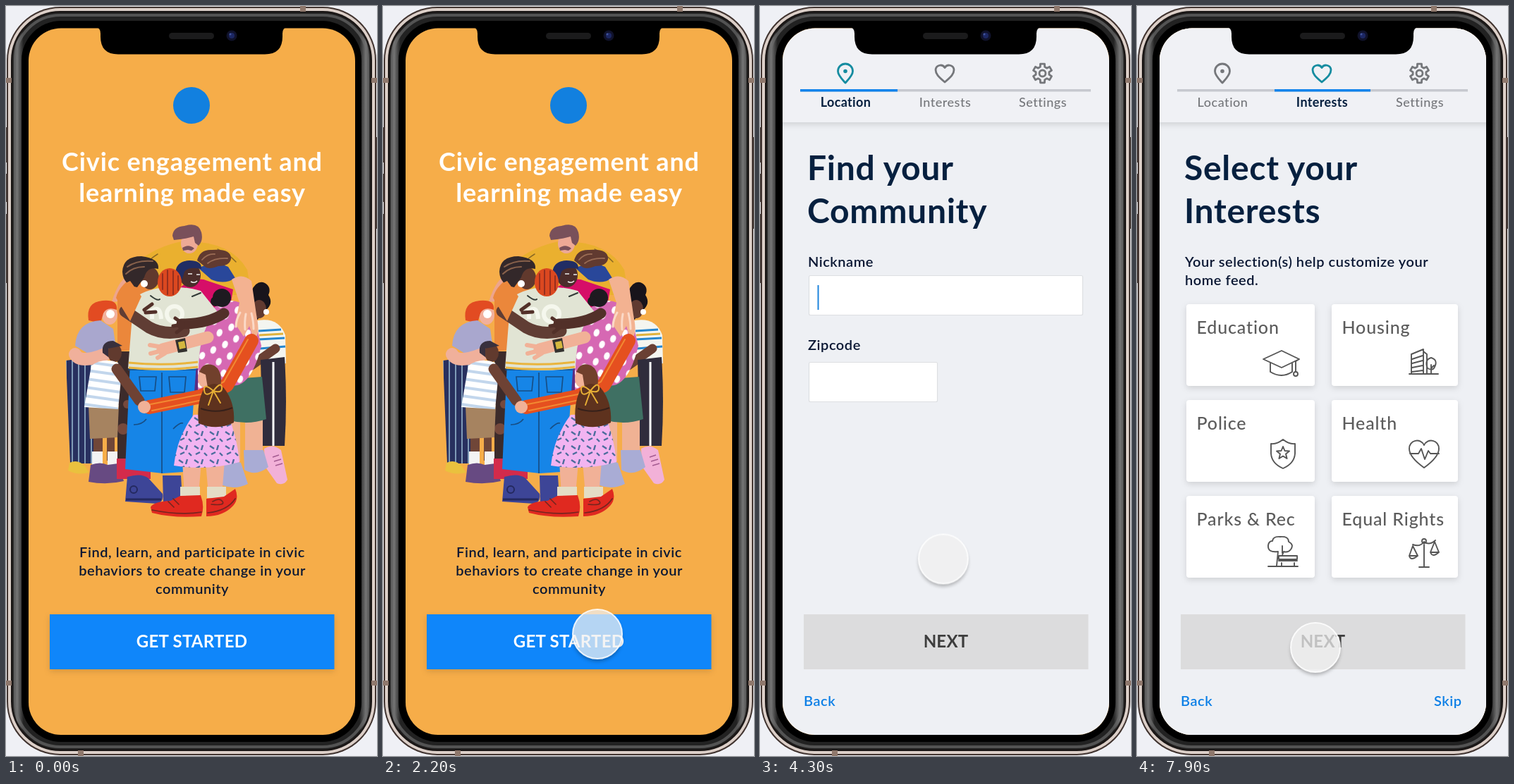
These frames come from a looping animation (526 by 1064 pixels, 8 s). An HTML page:

```html
<!DOCTYPE html>
<html lang="en">
<head>
<meta charset="utf-8">
<title>Civic app walkthrough</title>
<style>
html, body { margin: 0; width: 100%; height: 100%; overflow: hidden; background: #eff0f5; }
svg { display: block; }
#stage { width: 100%; height: 100%; }
text { font-family: Lato, "Open Sans", sans-serif; white-space: pre; }
.title { font-size: 36px; font-weight: 700; letter-spacing: .024em; fill: #fff; }
.head { font-size: 48px; font-weight: 700; letter-spacing: .015em; fill: #06203f; }
.body { font-size: 20px; font-weight: 600; letter-spacing: .027em; fill: #0a1733; }
.tab { font-size: 18px; font-weight: 500; letter-spacing: .03em; fill: #75777b; }
.tab.on { font-weight: 700; letter-spacing: .02em; fill: #06203f; }
.btn { font-size: 24px; font-weight: 700; letter-spacing: .01em; fill: #fff; }
.link { font-size: 20px; font-weight: 600; letter-spacing: .027em; fill: #0c7fe6; }
.typed { font-size: 28px; fill: #111; }
.card { font-size: 25px; font-weight: 500; letter-spacing: .034em; fill: #5c5c5c; }
.mid { text-anchor: middle; }
.icon { fill: none; stroke: #75777b; stroke-width: 2.8; stroke-linejoin: round; }
.icon.on { stroke: #158ca0; }
.thin { fill: none; stroke: #555; stroke-width: 1.9; stroke-linejoin: round; stroke-linecap: round; }
.field { fill: #fff; stroke: #dddfe2; stroke-width: 1.2; }
.limb { fill: none; stroke-linecap: round; stroke-linejoin: round; }
.raised { filter: drop-shadow(0 3px 4px rgba(0,0,0,.13)); }

#form, #filled, #interests { animation: 8s linear infinite; }
#form { animation-name: showForm; }
#filled { animation-name: showFilled; }
#interests { animation-name: showInterests; }
@keyframes showForm { 0%, 40.6% { opacity: 0 } 42.4%, 100% { opacity: 1 } }
@keyframes showFilled { 0%, 67.5% { opacity: 0 } 72.4%, 100% { opacity: 1 } }
@keyframes showInterests { 0%, 91.2% { opacity: 0 } 95%, 100% { opacity: 1 } }

#cursor { animation: travel 8s linear infinite; }
@keyframes travel {
  0%, 5% { transform: translate(428px, -45px); animation-timing-function: ease-out }
  11.25% { transform: translate(426px, 52px); animation-timing-function: cubic-bezier(.45, .1, .4, 1) }
  27.5% { transform: translate(304px, 891px); animation-timing-function: ease-in-out }
  38% { transform: translate(267px, 905px) }
  46.25% { transform: translate(267px, 905px); animation-timing-function: ease-in }
  53.75% { transform: translate(260px, 785px) }
  58% { transform: translate(217px, 612px); animation-timing-function: ease-out }
  62.5% { transform: translate(211px, 597px) }
  74% { transform: translate(211px, 597px); animation-timing-function: ease-in-out }
  83.75% { transform: translate(214px, 902px) }
  90% { transform: translate(216px, 902px); animation-timing-function: ease-in-out }
  98.75%, 100% { transform: translate(253px, 910px) }
}
#dot { fill: rgba(240,240,240,.74); stroke: rgba(255,255,255,.85); stroke-width: 2; }
#shade { fill: rgba(0,0,0,.27); filter: blur(2.5px); }
.ring { fill: none; animation: ripple 8s linear infinite; }
@keyframes ripple {
  0%, 35.5% { r: 36px; opacity: 0 }
  35.6% { r: 36px; opacity: 1 }
  40% { r: 94px; opacity: 1 }
  41.2% { r: 104px; opacity: 0 }
  86.4% { r: 36px; opacity: 0 }
  86.5% { r: 36px; opacity: 1 }
  91% { r: 94px; opacity: 1 }
  92.2%, 100% { r: 104px; opacity: 0 }
}
</style>
</head>
<body>
<svg id="stage" viewBox="0 0 526 1064">
<defs>
  <clipPath id="glass"><rect x="32" y="31.500" width="463" height="1002.500" rx="46"/></clipPath>
  <mask id="outside" maskUnits="userSpaceOnUse" x="-60" y="-60" width="120" height="120"><path fill="#fff" d="M-60-60H60V60H-60z"/><circle r="35"/></mask>
  <linearGradient id="metal"><stop stop-color="#222"/><stop offset=".012" stop-color="#777"/><stop offset=".03" stop-color="#222"/><stop offset=".97" stop-color="#222"/><stop offset=".988" stop-color="#777"/><stop offset="1" stop-color="#222"/></linearGradient>
  <pattern id="dots" width="25" height="26" patternUnits="userSpaceOnUse" patternTransform="rotate(20)"><path fill="#d668b3" d="M0 0h25v26H0z"/><ellipse cx="6" cy="7" rx="4" ry="5.500" fill="#fff"/><ellipse cx="18" cy="20" rx="4" ry="5.500" fill="#fff"/></pattern>
  <pattern id="dashes" width="22" height="20" patternUnits="userSpaceOnUse"><path fill="#f2b4f1" d="M0 0h22v20H0z"/><path d="M3 4l6 4M15 3l-2 7M5 16l6-3M17 14l4 4" stroke="#4b6c9c" stroke-width="2.4"/></pattern>
  <pattern id="pinstripe" width="9" height="9" patternUnits="userSpaceOnUse"><path fill="#28305f" d="M0 0h9v9H0z"/><path fill="#7f9bb8" d="M3 0h2v9H3z"/></pattern>
  <pattern id="bars" width="12" height="12" patternUnits="userSpaceOnUse" patternTransform="rotate(8)"><path fill="#fff" d="M0 0h12v12H0z"/><path fill="#c2d6ec" d="M0 2h12v4H0z"/></pattern>
  <path id="pin" d="M0 13.5C-4 9-10.5 3-10.5-3A10.5 10.5 0 0 1 10.5-3C10.5 3 4 9 0 13.5Z"/>
  <path id="heart" d="M0 12.5C-9 5-13 1-13-5A7 7 0 0 1 0-8A7 7 0 0 1 13-5C13 1 9 5 0 12.5Z"/>
  <path id="gear"/>
  <g id="topbar">
    <path fill="#eef0f4" d="M32 31h463v1003H32z"/>
    <path class="raised" fill="#f0f1f5" d="M26 20h475v145H26z"/>
    <path fill="#c7c9cf" d="M57 118h412v3.500H57z"/>
  </g>
  <g id="nextOff"><path fill="#dcdcdd" d="M62 863h403.500v78H62z"/><text class="btn mid" x="263.500" y="910" style="fill:#3d3d3d">NEXT</text></g>
</defs>

<!-- phone body -->
<g fill="#8f786c">
  <path d="M0 172h5v50H0zM0 295h5v98H0zM0 238h5v40H0zM521 186h5v130h-5z" fill="#4b403c"/>
  <rect x="1" y="1" width="524" height="1062" rx="76" fill="#40332f"/>
  <rect x="3" y="3" width="520" height="1058" rx="74" fill="#dccfc8"/>
  <rect x="7" y="7" width="512" height="1050" rx="70" fill="#1b1716"/>
  <rect x="9.500" y="9.500" width="507" height="1045" rx="68" fill="url(#metal)"/>
  <rect x="13" y="13" width="500" height="1038" rx="64" fill="none" stroke="#6d6d6d" stroke-width="4" opacity=".65"/>
  <rect x="22" y="21" width="482" height="1023" rx="56" fill="#000"/>
  <path d="M417 0h8v8h-8zM102 1056h8v8h-8zM0 102h8v7H0zM0 957h8v7H0zM518 102h8v7h-8zM518 957h8v7h-8z"/>
</g>

<g clip-path="url(#glass)">
<g id="welcome">
  <path fill="#f6ad49" d="M32 31h463v1003H32z"/>
  <circle cx="263" cy="141" r="26" fill="#1280df"/>
  <g class="title mid"><text x="264" y="233.500">Civic engagement and</text><text x="264" y="278">learning made easy</text></g>

  <g id="crowd">
    <!-- back row -->
    <path fill="#eab02f" d="M183 365Q215 340 250 334Q318 332 342 374L348 410H185Z"/>
    <path d="M300 345q15 6 26 18M215 352q-10 6-14 12" class="limb" stroke="#8c6a24" stroke-width="1.500"/>
    <ellipse cx="260" cy="337" rx="12" ry="14" fill="#eda996"/>
    <path fill="#79505a" d="M236 326q1-13 17-14q20-6 24 9q3 12-4 19l-5-4-2-9q-14 4-28 5zM250 343q9-6 17 1l-4 3-5-1-7 1z"/>
    <path fill="#eda58d" d="M150 420q10-35 32-44l6 40z"/>
    <path fill="#eb873b" d="M158 410q10-24 30-26l22 20-10 82-42 4z"/>
    <path fill="#3c2b2b" d="M158 490h30v165h-30z"/>
    <g fill="#76493c"><circle cx="166" cy="600" r="8"/><circle cx="172" cy="565" r="6"/></g>
    <path fill="#5b2e82" d="M262 460h42v95h-42z"/>
    <path fill="#d60e68" d="M246 400q22-18 40-10l36 12-5 30-20 75h-38z"/>
    <path fill="#29479a" d="M273 372q20-12 42-2l10 16q-15 10-34 2z"/>
    <path fill="#613a30" d="M271 361q4-16 21-15q28-2 27 13q-2 10-18 10q-14 6-20 0z"/>
    <path d="M278 360q8-9 18-8m-10 13q10-8 28-7" class="limb" stroke="#9a6c55" stroke-width="1.800"/>
    <ellipse cx="261" cy="382" rx="15" ry="17" fill="#4b2d2b"/>
    <path fill="#212d64" d="M241 386q-4-24 19-25q18 0 17 12q-18-4-24 4l-4 13z"/>
    <path d="M258 380h6m6 1h5M262 391q5 3 9-1" stroke="#eee" stroke-width="1.500" fill="none"/>
    <ellipse cx="204" cy="386" rx="13" ry="16" fill="#61392d"/>
    <path fill="#33282a" d="M165 377q1-22 27-22q26 3 24 18q-16-4-20 12l-10 14q-20-3-21-22z"/>
    <path d="M172 370q14-10 36-8m-38 18q10-10 26-10" class="limb" stroke="#88614b" stroke-width="2"/>
    <circle cx="196" cy="394" r="5" fill="#fff"/>

    <!-- right side -->
    <path fill="#18141b" d="M348 404q8-16 19-11q10 6 5 17q8 12-4 22l-16 18-8-34z"/>
    <ellipse cx="359" cy="430" rx="10" ry="13" fill="#613a30"/><circle cx="369" cy="434" r="4" fill="#fff"/>
    <path fill="#f4f5f0" d="M352 447q34-8 44 20l1 40h-38z"/>
    <path d="M358 461l32-2M358 473l37-2M360 486l36-3" stroke="#2787ce" stroke-width="3"/><path d="M359 467l34-2" stroke="#e0b23c" stroke-width="3"/>
    <path class="limb" d="M382 486L348 510" stroke="#6a4034" stroke-width="13"/>
    <path fill="#302c3c" d="M361 502l34-4q4 62 0 126h-31z"/><path d="M379 505v119" stroke="#fff" stroke-width="3"/>
    <path fill="#f2b1d8" d="M366 628q12-8 24 2l9 42q-5 9-15 5l-17-24z"/><path d="M378 640l9-3m-7 9l10-3m-8 9l10-3" stroke="#a45b91" stroke-width="1.500"/>
    <path fill="#f0b294" d="M309 584h23v62h-23zM339 584h25v50h-25z"/>
    <path fill="#a9acd5" d="M309 640l24 8 10 30q-18 9-36 2l-5-30zM337 630h28l7 24q-18 14-34 4z"/>
    <path fill="#3f7063" d="M309 530l54-4 6 60q-25 9-52 2z"/>
    <path fill="url(#dots)" d="M272 462q14-40 48-44q26 2 34 30l8 34q-12 50-34 56l-56 8z"/>
    <path fill="#f3b291" d="M320 388q15-10 28 2l7 48q7 34-5 32l-5-16-8 15-12-18 6-30z"/>
    <path d="M332 435q-6 10-6 20m14-18q-2 10-1 22m9-23q3 12 3 22" class="limb" stroke="#fbd9c7" stroke-width="3"/>
    <circle cx="306" cy="414" r="13" fill="#1e1a20"/><circle cx="297" cy="419" r="7" fill="#1e1a20"/>

    <!-- left side -->
    <path fill="url(#pinstripe)" d="M85 503l42-6 4 152H91Z"/>
    <path fill="#eac13e" d="M90 648q12-6 22 5l6 9q-18 4-30-3z"/>
    <ellipse cx="147" cy="438" rx="11" ry="14" fill="#f2b09c"/>
    <path fill="#e24b22" d="M117 446q-4-26 20-28q22-2 20 13q-14-5-19 5l-4 14z"/><circle cx="148" cy="437" r="6" fill="#fff"/>
    <path fill="#a9a7ce" d="M98 482q2-34 36-36l18 12 5 34-26 10z"/>
    <path class="limb" d="M98 494q8 16 52-4" stroke="#f0b09b" stroke-width="18"/>
    <ellipse cx="154" cy="492" rx="10" ry="13" fill="#613a2e"/><path fill="#39303d" d="M137 492q-2-17 15-17l13 7-20 4v12z"/>
    <path fill="#704638" d="M124 605h13v40h-13zM143 605h11v40h-11z"/><path fill="#f3f3f3" d="M122 632h15v20h-15zM144 632h14v20h-14z"/>
    <path fill="#674a82" d="M120 651q14-5 24 0l15-2 8 25q-24 6-50 1z"/>
    <path fill="#d32b4b" d="M157 642h48v29h-48z"/>
    <path fill="#a68360" d="M117 566h43l-2 46-39 2z"/>
    <path fill="url(#bars)" d="M121 510q18-12 38-4l4 24-4 42-48-3z"/>

    <!-- centre -->
    <path fill="#3d4597" d="M172 668q20-6 30 2l20 22q2 12-8 14l-45-3zM222 666h26l2 34-27 4z"/><path d="M170 700h50" stroke="#24295f" stroke-width="3"/><circle cx="181" cy="686" r="5" fill="none" stroke="#24295f" stroke-width="2"/>
    <path fill="#1685e7" d="M176 506h94l-6 84-12 71-30 2-53-6z"/>
    <path d="M189 526h24l-2 20h-20zM231 526h24l-2 22h-20zM221 520v143m-40-69q12 0 18-8m38 14q10-10 14-8M173 516h96" fill="none" stroke="#174e85" stroke-width="1.700"/>
    <path fill="#e1e4d4" d="M181 414q38-25 95-10l24 30q-26 22-27 80-50 6-100 0z"/>
    <path d="M174 506q50 5 98-1M174 513q50 5 98-1" fill="none" stroke="#e9b43d" stroke-width="3"/>
    <path d="M207 444v-12q12-8 13 12m8-7a10 10 0 1 0 22 0a10 10 0 1 0-22 0" fill="none" stroke="#f5f7ed" stroke-width="6"/>
    <path d="M205 411q10 8 13 5m46-4l12-5" class="limb" stroke="#333b38" stroke-width="2"/>
    <ellipse cx="232" cy="392" rx="17" ry="20" fill="#db4820"/>
    <path d="M222 380v22m7-27v34m8-33v33m7-26v20" class="limb" stroke="#8e2d1e" stroke-width="1.800"/>
    <path class="limb" d="M169 433L203 456Q225 468 252 461" stroke="#603d34" stroke-width="17"/>
    <path fill="#eb873b" d="M156 414q5-18 20-24l16 22-16 35z"/>
    <path class="limb" d="M309 436Q286 451 249 451" stroke="#523029" stroke-width="15"/>
    <path class="limb" d="M250 450l-10-7m10 9l-13 2m14 2l-9 7M196 431l11-8m-9 12l14-1" stroke="#523029" stroke-width="5"/>
    <path class="limb" d="M286 470L222 487" stroke="#f1b197" stroke-width="17"/><path class="limb" d="M222 484l-18-3m17 8l-16 4m20 0l-10 6" stroke="#f1b197" stroke-width="6"/>
    <path fill="#33312f" d="M240 474l14-3 3 19-13 2z"/><path fill="#d4b73f" d="M244 477l9-2 2 10-9 2z"/>
    <path class="limb" d="M157 515L189 560" stroke="#6e4234" stroke-width="15"/>

    <!-- girl in front -->
    <path class="limb" d="M203 569L276 554 313 538 348 475" stroke="#e5501f" stroke-width="20"/>
    <path class="limb" d="M205 565L276 551 309 533 343 473M207 574L278 559" stroke="#f28a32" stroke-width="2"/>
    <circle cx="196" cy="569" r="9" fill="#f1b197"/>
    <path fill="#f1b197" d="M250 646h27l-4 48h-20zM283 646h27l-4 48h-19z"/>
    <path fill="#e4ddc6" d="M247 682h28v16h-28zM285 682h27v16h-27z"/>
    <path fill="#e02920" d="M205 711q4-8 28-9l14-7 29-1q6 16 1 30-40 3-70-5zM284 699l25-3 16-11q6 14-3 24-14 15-38 15z"/>
    <path d="M207 715q40 8 70 3m9 1q28-3 39-20M230 703l8 8m-1-12l8 8m48-4q10-6 14 0t-16 4" class="limb" stroke="#76251f" stroke-width="1.700"/>
    <path fill="url(#dashes)" d="M266 580l48-2q14 34 17 69-46 13-93 5 4-40 28-72z"/>
    <ellipse cx="281" cy="528" rx="9" ry="13" fill="#f1b197"/>
    <path fill="#71402c" d="M274 519q6-15 21-9 13 8 9 30l-17 8-4-25z"/>
    <path fill="#5e321e" d="M280 544q14-15 29-2 16 20 14 49-24 12-50 1-3-28 7-48z"/>
    <path d="M276 571q22 8 45-1" fill="none" stroke="#36201a" stroke-width="2"/><path d="M294 546q-14-12-13-1t13 1q11-14 12-5t-12 5l-7 20m7-20l10 17" class="limb" stroke="#e7ae35" stroke-width="2"/>
  </g>

  <g class="body mid"><text x="264" y="782">Find, learn, and participate in civic</text><text x="264" y="808">behaviors to create change in your</text><text x="264" y="834">community</text></g>
  <path class="raised" fill="#0f86fa" d="M62 863h403.500v78H62z"/>
  <text class="btn mid" x="263.500" y="910">GET STARTED</text>
</g>

<g id="form">
  <use href="#topbar"/><path fill="#1384ec" d="M57 118h138v3.500H57z"/>
  <g data-tabs="0"></g>
  <g class="head"><text x="67" y="247">Find your</text><text x="67" y="308">Community</text></g>
  <text class="body" x="68" y="370">Nickname</text><rect class="field" x="69.500" y="382.500" width="388" height="56" rx="2"/>
  <text class="body" x="68" y="488">Zipcode</text><rect class="field" x="69.500" y="505.500" width="182" height="56" rx="2"/>
  <path fill="#1d84dd" d="M81.500 396h2v35h-2z"/>
  <use href="#nextOff"/>
  <text class="link" x="62" y="993">Back</text>
  <g id="filled">
    <path fill="#fff" d="M74 390h60v44H74z"/>
    <text class="typed" x="81" y="423">Jorim</text><text class="typed" x="81" y="546">94501</text>
    <path fill="#eef0f4" d="M250.500 504h3v59h-3z"/><path fill="#23b26b" d="M69 560h181.500v2.800H69z"/>
    <g class="body"><text x="69" y="609">You live in Alameda, CA, Congressional</text><text x="69" y="636">District 13.</text></g>
    <path class="raised" fill="#0f86fa" d="M62 863h403.500v78H62z"/>
    <text class="btn mid" x="263.500" y="910">NEXT</text>
  </g>
</g>

<g id="interests">
  <use href="#topbar"/><path fill="#1384ec" d="M195 118h136v3.500H195z"/>
  <g data-tabs="1"></g>
  <g class="head"><text x="67" y="247">Select your</text><text x="67" y="308">Interests</text></g>
  <g class="body"><text x="68" y="370">Your selection(s) help customize your</text><text x="68" y="396">home feed.</text></g>
  <g id="cards"></g>
  <g class="thin">
    <path d="M179 501l26-12 25 12-25 12zM189 506v13q16 10 31 0v-13M230 501l-5 3v15"/><circle cx="225" cy="522" r="3"/>
    <path d="M386 522h41M389 522v-28l17-7v35M406 490l5 4v28M390 501l15-5m-15 11l15-4m-15 10l15-3m-15 9l15-2M417 522v-13m0 5l4-4M412 514q-5-12 5-15 10 3 5 13-2 6-10 2"/>
    <path d="M207 615q9 7 17 6v14q-1 14-17 21-16-7-17-21v-14q8 1 17-6zM207 625l2.500 6 6.500.5-5 4 1.600 6.500-5.600-3.500-5.600 3.500 1.600-6.500-5-4 6.500-.5z"/>
    <path d="M407 655C393 645 386 637 386 628A11 11 0 0 1 407 623A11 11 0 0 1 428 628C428 637 421 645 407 655ZM387 635h12l4-7 5 15 5-12 3 4h12"/>
    <path d="M198 794l2-20q-15 2-14-9 1-6 6-6 1-7 11-6 12-1 12 7 8 4 3 11-4 5-10 3l-2 5M206 766v10M201 780h26v5h-26zm0 7h26m-22 3v5m18-5v5M186 795h42"/>
    <path d="M407 764v32m-7 0h14M391 764q10 4 16-4 7 6 16-2M391 766l-5 14h12zm31-6l-6 15h12zM386 780q2 8 12 0M416 775q3 8 12 0"/><circle cx="407" cy="759" r="3"/>
  </g>
  <use href="#nextOff"/>
  <text class="link" x="62" y="993">Back</text><text class="link" x="421" y="993">Skip</text>
</g>
</g>

<!-- notch -->
<path d="M126 30q8 0 8 9v4.500q0 25 25 25h208q25 0 25-25v-4.500q0-9 8-9z"/>
<rect x="231" y="38" width="64" height="9" rx="4.500" fill="#1b1b1c"/>
<circle cx="320" cy="42" r="7.500" fill="#10122b"/><circle cx="320" cy="42" r="4" fill="#1c2763"/><circle cx="318" cy="40" r="1.500" fill="#41549c"/>

<g id="cursor">
  <circle class="ring" r="36" stroke="#fff" stroke-width="5"/><circle class="ring" r="36" stroke="#0b0b0b" stroke-width="2.600"/>
  <g mask="url(#outside)"><circle id="shade" r="35" cy="4"/></g>
  <circle id="dot" r="35"/>
</g>
</svg>
<script>
const TAU = Math.PI * 2;
const gearPoints = [];
for (let tooth = 0; tooth < 6; tooth++) {
  for (const [offset, radius] of [[-.34, 9.6], [-.22, 13.6], [.22, 13.6], [.34, 9.6]]) {
    const a = (tooth + 1.5) / 6 * TAU + offset;
    gearPoints.push((radius * Math.cos(a)).toFixed(1) + " " + (radius * Math.sin(a)).toFixed(1));
  }
}
document.getElementById("gear").setAttribute("d", "M" + gearPoints.join("L") + "Z");

const tabs = [["pin", "Location", 121, 1.4, -3], ["heart", "Interests", 262, 0, 0], ["gear", "Settings", 400.5, 4.5, 0]];
for (const group of document.querySelectorAll("[data-tabs]")) {
  group.innerHTML = tabs.map(([icon, label, x, hole, holeY], i) => {
    const on = i === +group.dataset.tabs ? " on" : "";
    return `<g class="icon${on}" transform="translate(${x} 95.500)"><use href="#${icon}"/>` +
      (hole ? `<circle r="${hole}" cy="${holeY}"/>` : "") +
      `</g><text class="tab mid${on}" x="${x + .5}" y="143">${label}</text>`;
  }).join("");
}

const topics = ["Education", "Housing", "Police", "Health", "Parks &amp; Rec", "Equal Rights"];
document.getElementById("cards").innerHTML = topics.map((topic, i) => {
  const right = i % 2, x = right ? 276 : 70, y = 423 + 136 * (i >> 1);
  return `<rect class="raised" x="${x}" y="${y}" width="${right ? 179 : 182}" height="116" rx="4" fill="#fff"/>` +
    `<text class="card" x="${x + 14.5}" y="${y + 42}">${topic}</text>`;
}).join("");
</script>
</body>
</html>
```
